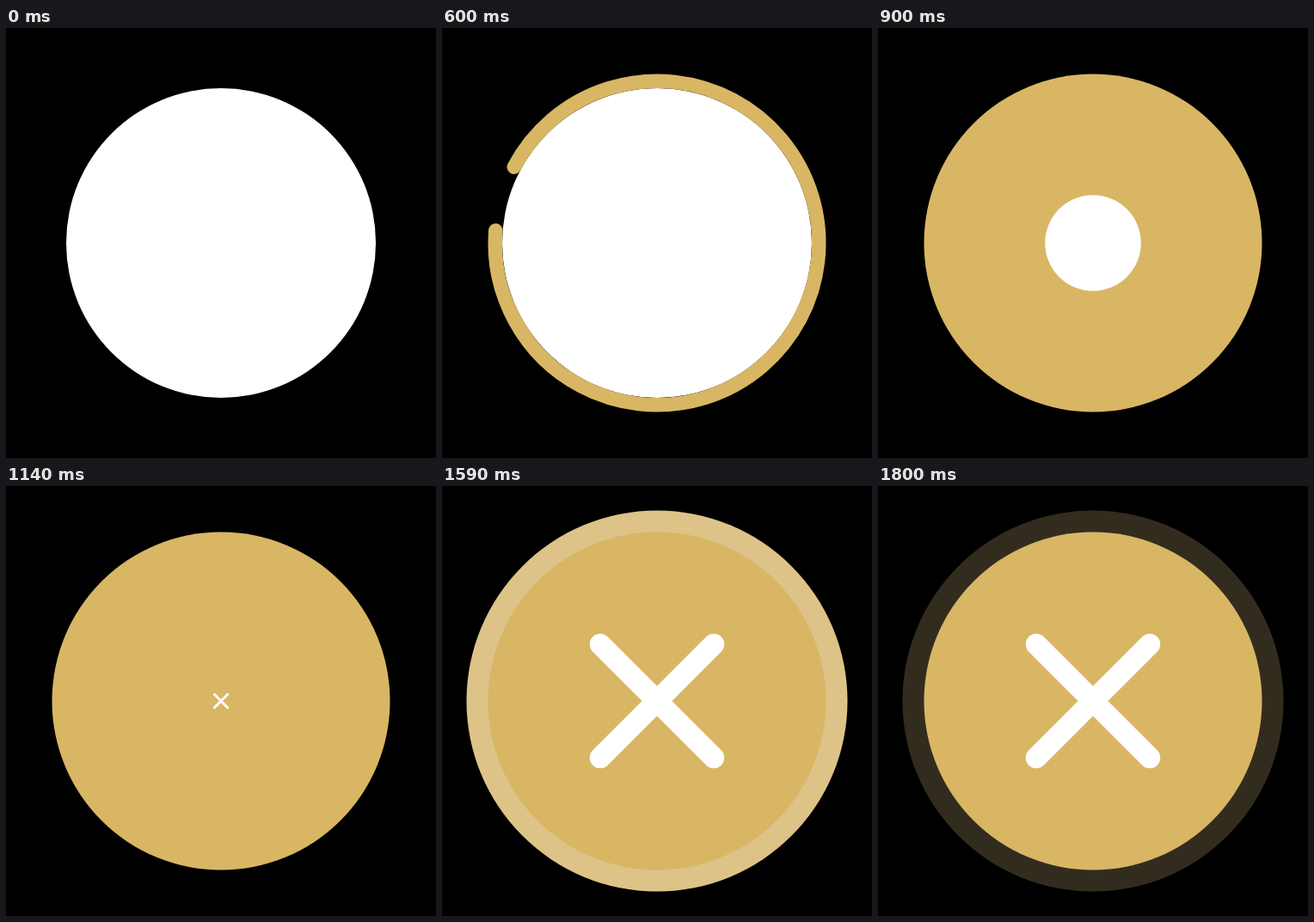
Animation of 500x500 px, one loop 1830 ms. Source, as an HTML page with a canvas:

```html
<!DOCTYPE html>
<html lang="en">
<head>
<meta charset="utf-8">
<title>Cross badge</title>
<style>
html, body { margin: 0; height: 100%; overflow: hidden; background: #000; }
canvas { display: block; }
</style>
</head>
<body>
<canvas id="stage" width="500" height="500"></canvas>
<script>
const ctx = document.getElementById('stage').getContext('2d');
const STEP = 30, STEPS = 61;
const GOLD = '#d9b664', PALE = '#ddc388', WHITE = '#fff';
const START = -152 * Math.PI / 180;

// Eased progress from step a to step b
function ease(f, a, b) {
  const t = Math.min(1, Math.max(0, (f - a) / (b - a)));
  return t * t * (3 - 2 * t);
}

function disc(r, color) {
  if (r <= 0) return;
  ctx.fillStyle = color;
  ctx.beginPath();
  ctx.arc(0, 0, r, 0, 2 * Math.PI);
  ctx.fill();
}

function outline(f) {
  const part = ease(f, 0, 23.7);
  if (!part) return;
  ctx.strokeStyle = GOLD;
  ctx.lineWidth = 16.5;
  ctx.beginPath();
  ctx.arc(0, 0, 188.25, START, START + part * 2 * Math.PI);
  ctx.stroke();
}

function halo(f) {
  const grow = ease(f, 32.2, 53);
  ctx.globalAlpha = grow * (1 - ease(f, 54, 62.7));
  disc(168 + 53.5 * grow, PALE);
  ctx.globalAlpha = 1;
}

function cross(f) {
  const size = ease(f, 36, 45.4);
  if (!size) return;
  const d = 66 * size;
  ctx.strokeStyle = WHITE;
  ctx.lineWidth = 24.5 * size;
  ctx.beginPath();
  ctx.moveTo(-d, -d);
  ctx.lineTo(d, d);
  ctx.moveTo(d, -d);
  ctx.lineTo(-d, d);
  ctx.stroke();
}

function draw(f) {
  ctx.setTransform(1, 0, 0, 1, 0, 0);
  ctx.fillStyle = '#000';
  ctx.fillRect(0, 0, 500, 500);
  ctx.translate(250, 250);
  ctx.lineCap = 'round';
  halo(f);
  if (f > 21.5) disc(f < 24 ? 180.5 : 196.5, GOLD);
  disc(180 * (1 - ease(f, 21.5, 35)), WHITE);
  outline(f);
  cross(f);
}

const begin = performance.now();
function tick() {
  draw(Math.floor((performance.now() - begin) / STEP) % STEPS);
  requestAnimationFrame(tick);
}
tick();
</script>
</body>
</html>
```
